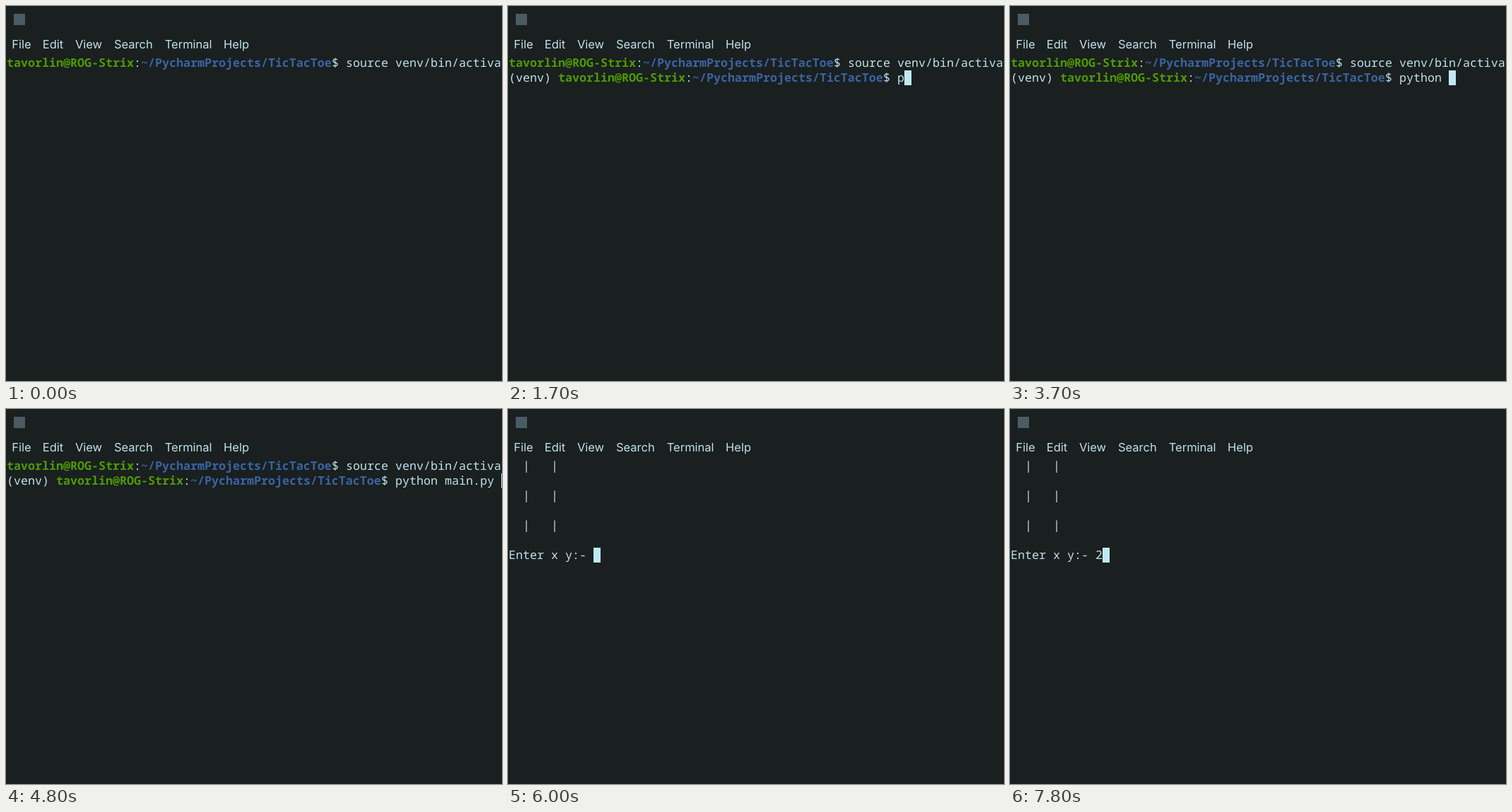
An HTML page that plays this animation: 702 by 530 pixels, repeating every 8 s.

```html
<!DOCTYPE html>
<html lang="en">
<head>
<meta charset="utf-8">
<title>Terminal session</title>
<style>
  html, body { margin: 0; width: 100%; height: 100%; overflow: hidden; background: #1a1f20; }
  svg { display: block; width: 702px; height: 530px; }
  text { white-space: pre; text-rendering: geometricPrecision; fill: #bfe2ea; }
  .menu { font: 16.5px Inter, sans-serif; }
  .term { font: 16.667px "Roboto Mono", "Noto Sans Mono", "DejaVu Sans Mono", monospace; }
  .user { fill: #4e9a06; font-weight: 700; }
  .path { fill: #3a64a2; font-weight: 700; }
</style>
</head>
<body>
<svg id="stage" viewBox="0 0 702 530">
  <rect width="702" height="530" fill="#1a1f20"/>
  <rect x="11" y="11" width="16" height="16" fill="#4b5b64"/>
  <g id="menu"></g>
  <g id="screen"></g>
  <rect id="cursor" width="10" height="21" fill="#bfe9f2"/>
</svg>
<script>
const LOOP = 8000, CELL = 10, ROW = 21, LEFT = 1, TOP = 70, BASELINE = 16;
const NS = "http://www.w3.org/2000/svg";
const USER = "tavorlin@ROG-Strix";
const PATH = "~/PycharmProjects/TicTacToe";
const screenGroup = document.getElementById("screen");
const cursor = document.getElementById("cursor");

function add(parent, tag, attrs, content = "") {
  const node = document.createElementNS(NS, tag);
  for (const name in attrs) node.setAttribute(name, attrs[name]);
  node.textContent = content;
  parent.appendChild(node);
  return node;
}

const menu = { File: 8.3, Edit: 51.8, View: 97.9, Search: 152.9, Terminal: 224.7, Help: 308 };
for (const label in menu) {
  add(document.getElementById("menu"), "text", { class: "menu", x: menu[label], y: 60 }, label);
}

const plain = text => [["", text]];
const prompt = (prefix, command) =>
  [["", prefix], ["user", USER], ["", ":"], ["path", PATH], ["", "$ " + command]];

const activate = prompt("", "source venv/bin/activate");
const shell = command => [activate, prompt("(venv) ", command)];
const bars = plain("  |   |  ");
const game = input =>
  [bars, [], bars, [], bars, [], plain("Enter x y:- " + input)];

// Each state holds from its start time until the next one.
const state = (start, lines, cursorOn) => ({ start, lines, cursorOn });
const states = [
  state(0, [activate], false),
  state(500, shell(""), true),
  state(1100, shell(""), false),
  state(1700, shell("p"), true),
  state(2200, shell("py"), true),
  state(2300, shell("python"), true),
  state(3000, shell("python"), false),
  state(3300, shell("python"), true),
  state(3700, shell("python "), true),
  state(3900, shell("python ma"), true),
  state(4000, shell("python mai"), true),
  state(4200, shell("python main.py "), true),
  state(4900, game(""), true),
  state(5400, game(""), false),
  state(6000, game(""), true),
  state(6600, game(""), false),
  state(7200, game(""), true),
  state(7800, game("2"), true)
];

function drawLine(line, row) {
  let column = 0;
  for (const [style, text] of line) {
    add(screenGroup, "text", {
      class: "term " + style,
      x: LEFT + column * CELL,
      y: TOP + row * ROW + BASELINE
    }, text);
    column += text.length;
  }
  return column;
}

let shown = null;
function render(time) {
  const current = states.filter(s => s.start <= time).pop();
  if (current === shown) return;
  shown = current;
  screenGroup.replaceChildren();
  const lastColumn = current.lines.map(drawLine).pop();
  cursor.setAttribute("x", LEFT + lastColumn * CELL);
  cursor.setAttribute("y", TOP + (current.lines.length - 1) * ROW);
  cursor.setAttribute("visibility", current.cursorOn ? "visible" : "hidden");
}

const origin = performance.now();
function tick() {
  render((performance.now() - origin) % LOOP);
  requestAnimationFrame(tick);
}
tick();
</script>
</body>
</html>
```
